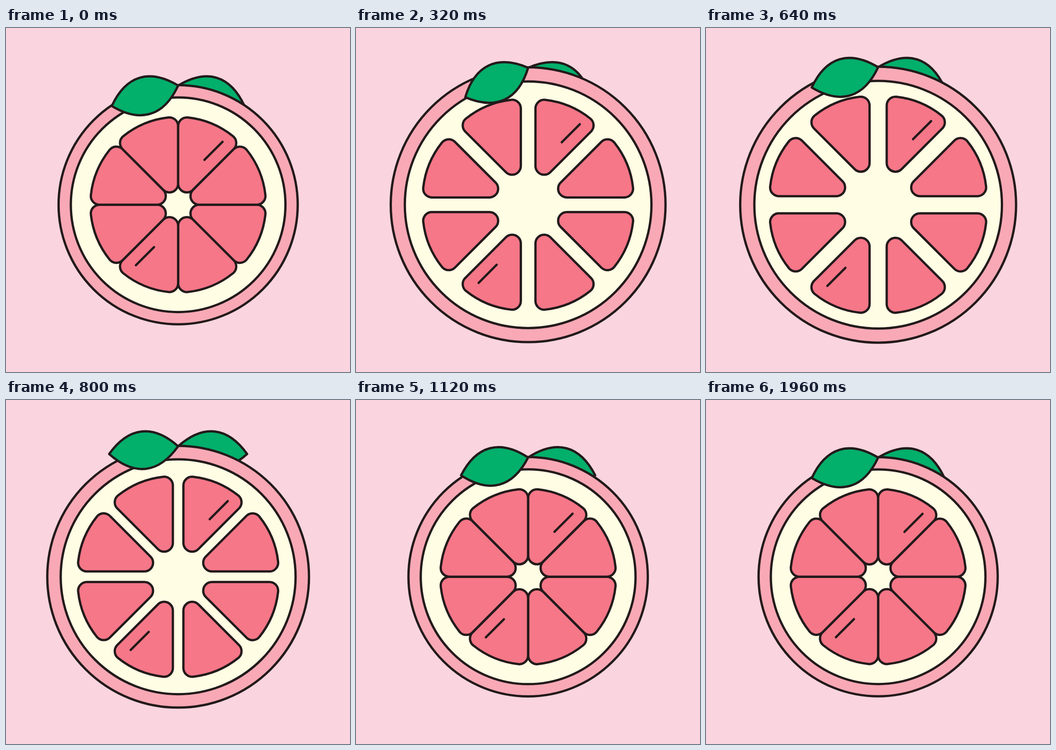
An HTML page with a canvas for the animation above (2000 ms loop, 748 by 748 pixels).

```html
<!DOCTYPE html>
<html lang="en">
<head>
<meta charset="utf-8">
<title>Grapefruit</title>
<style>
html, body { margin: 0; width: 100%; height: 100%; overflow: hidden; background: #fad5df; }
canvas { display: block; width: 100vw; height: 100vh; }
</style>
</head>
<body>
<canvas id="stage" width="748" height="748"></canvas>
<script>
const SIZE = 748, LOOP = 2000, STEP = 40;
const C = 374.3, CY = 384.3;
const INK = '#231a1b', BACK = '#fad5df', RIND = '#f9a9b5';
const PITH = '#fffde4', FLESH = '#f67788', LEAF = '#02af6b';
const REST_R = 260, GROW = 40.6, PITH_RATIO = 0.8975, SPREAD = 49.5;
const OCT = Math.PI / 4, RAD = Math.PI / 180;
const ctx = document.getElementById('stage').getContext('2d');

const clamp = v => Math.min(1, Math.max(0, v));
const smooth = s => s * s * (3 - 2 * s);

// Cubic bezier easing with flat ends: handles (a, 0) and (b, 1).
function ease(x, a, b) {
  x = clamp(x);
  let lo = 0, hi = 1;
  for (let i = 0; i < 30; i++) {
    const s = (lo + hi) / 2, q = 1 - s;
    if (3 * q * q * s * a + 3 * q * s * s * b + s * s * s < x) lo = s;
    else hi = s;
  }
  return smooth(lo);
}

const shrink = t => 1 - ease((t - 600) / 560, 0.333, 0.437);

function radiusAt(t) {
  const tau = 106;
  const k = t < 600 ? (1 - Math.exp(-t / tau)) / (1 - Math.exp(-600 / tau)) : shrink(t);
  return REST_R + GROW * k;
}

function spreadAt(t) {
  return SPREAD * (t < 600 ? ease(t / 600, 0.389, 0.148) : shrink(t));
}

// Leaf droop in degrees relative to rest.
function droopAt(t) {
  if (t < 160) return 16 * smooth(t / 160);
  if (t < 630) return 16 * (1 - ease((t - 160) / 440, 0.35, 0.29));
  if (t < 800) return -10.7 * smooth((t - 630) / 170);
  return -10.7 * (1 - ease((t - 800) / 800, 0.1, 0.045));
}

function paint(fill) {
  ctx.fillStyle = fill;
  ctx.fill();
  ctx.stroke();
}

function disc(r, fill) {
  ctx.beginPath();
  ctx.arc(C, CY, r, 0, 2 * Math.PI);
  paint(fill);
}

function leaf(r, droop, side) {
  const len = 151, along = 49, bulge = 54.5;
  ctx.save();
  ctx.translate(C, CY - r + 0.9);
  ctx.scale(side, 1);
  ctx.rotate(-(17.1 + droop) * RAD);
  ctx.beginPath();
  ctx.moveTo(0, 0);
  ctx.bezierCurveTo(-along, -bulge, along - len, -bulge, -len, 0);
  ctx.bezierCurveTo(along - len, bulge, -along, bulge, 0, 0);
  ctx.closePath();
  paint(LEAF);
  ctx.restore();
}

// A 45 degree wedge along +x with three rounded corners.
function wedge(shift) {
  const R = 190.9, f = 19, half = OCT / 2;
  const inner = f / Math.sin(half);
  const far = R - f;
  const turn = half - Math.asin(f / far);
  const fx = far * Math.cos(turn), fy = far * Math.sin(turn);
  ctx.save();
  ctx.translate(shift, 0);
  ctx.beginPath();
  ctx.arc(inner, 0, f, Math.PI / 2 + half, 1.5 * Math.PI - half);
  ctx.arc(fx, -fy, f, -Math.PI / 2 - half, -turn);
  ctx.arc(0, 0, R, -turn, turn);
  ctx.arc(fx, fy, f, turn, Math.PI / 2 + half);
  ctx.closePath();
  paint(FLESH);
  ctx.restore();
}

function shine(x, y, dx, dy) {
  ctx.beginPath();
  ctx.moveTo(x + dx, y + dy);
  ctx.lineTo(x + dx + 39.3, y + dy - 39.3);
  ctx.stroke();
}

function draw(t) {
  const r = radiusAt(t), d = spreadAt(t), droop = droopAt(t);
  ctx.fillStyle = BACK;
  ctx.fillRect(0, 0, SIZE, SIZE);
  ctx.strokeStyle = INK;
  ctx.lineWidth = 5;
  ctx.lineCap = ctx.lineJoin = 'round';

  leaf(r, droop, -1);
  disc(r, RIND);
  disc(r * PITH_RATIO, PITH);
  for (let i = 0; i < 8; i++) {
    ctx.save();
    ctx.translate(C, CY);
    ctx.rotate((i + 0.5) * OCT);
    wedge(d);
    ctx.restore();
  }
  const dx = d * Math.sin(OCT / 2), dy = d * Math.cos(OCT / 2);
  shine(431.5, 286.8, dx, -dy);
  shine(282.5, 515.8, -dx, dy);
  leaf(r, droop, 1);
}

const start = performance.now();
function tick() {
  const t = (performance.now() - start) % LOOP;
  draw(Math.floor(t / STEP) * STEP);
  requestAnimationFrame(tick);
}
tick();
</script>
</body>
</html>
```
